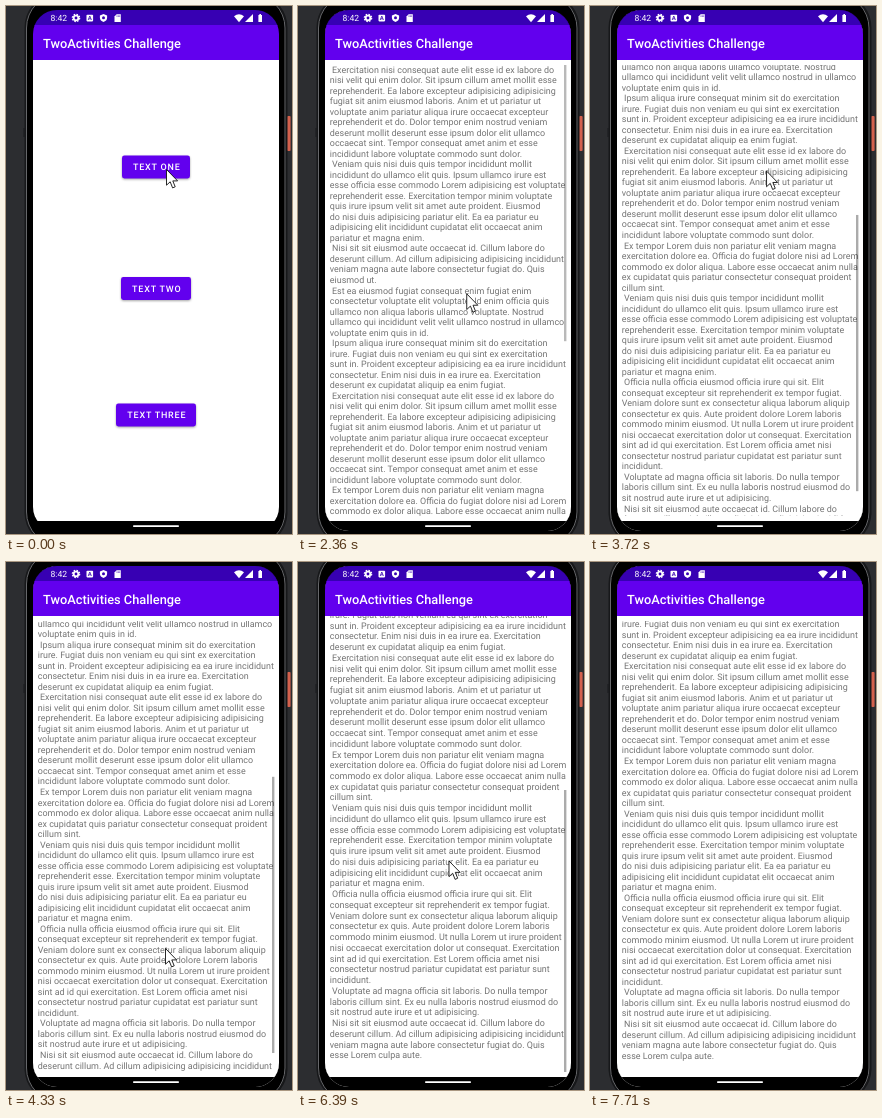
An HTML page that plays this animation: 286 px wide and 528 px high, repeating every 8.48 s.

```html
<!DOCTYPE html>
<html lang="en">
<head>
<meta charset="utf-8">
<title>TwoActivities Challenge</title>
<style>
  html, body { margin: 0; width: 100%; height: 100%; overflow: hidden; background: #2c2d30; }
  svg { display: block; width: 286px; height: 528px; }
  text { font-family: Roboto, Arial, sans-serif; text-rendering: geometricPrecision; white-space: pre; }
  .title { font-size: 12.8px; font-weight: 500; fill: #fff; }
  .label { font-size: 8.97px; font-weight: 500; letter-spacing: .0893em; fill: #fff; text-anchor: middle; }
  .body text { font-size: 8.95px; fill: #747474; }
  .clock { font-size: 8.6px; fill: #fff; }
  .button { filter: drop-shadow(0 1px .8px rgba(0, 0, 0, .35)); }
  .window { transform-box: view-box; transform-origin: 150px 264.5px; }
</style>
</head>
<body>
<svg viewBox="0 0 286 528">
  <defs>
    <clipPath id="screen"><rect x="27" y="4" width="246" height="521" rx="24"/></clipPath>
    <clipPath id="page"><rect x="27" y="54" width="246" height="461"/></clipPath>
    <clipPath id="viewport"><rect x="31" y="59" width="238" height="451"/></clipPath>
    <g id="chrome">
      <rect x="27" y="4" width="246" height="521"/>
      <rect x="27" y="4" width="246" height="16" fill="#3700b3"/>
      <rect x="27" y="19" width="246" height="35" fill="#6200ee"/>
      <rect x="27" y="54" width="246" height="461" fill="#fff"/>
      <text class="title" x="37" y="42">TwoActivities Challenge</text>
    </g>
  </defs>

  <rect width="286" height="528" fill="#2c2d30"/>
  <rect x="17" y="122" width="3" height="9" fill="#222326"/>
  <rect x="281" y="110" width="3.6" height="35" rx="1" fill="#d4614d"/>
  <rect x="19.5" y="-13" width="261" height="554" rx="35" stroke="#17181a" stroke-width="2"/>
  <rect x="20.5" y="-12" width="258.5" height="552" rx="34" stroke="#66676a"/>

  <g clip-path="url(#screen)">
    <g id="menu" class="window"><use href="#chrome"/></g>
    <g id="reader" class="window">
      <use href="#chrome"/>
      <g clip-path="url(#page)">
        <g id="stretch">
          <g clip-path="url(#viewport)">
            <g id="lines" class="body"></g>
            <rect id="thumb" x="266" width="2.4" fill="#000" fill-opacity=".33"/>
          </g>
        </g>
      </g>
    </g>
  </g>

  <text class="clock" x="44.5" y="15">8:42</text>
  <g fill="#fff">
    <circle cx="70" cy="12" r="2.3" fill="none" stroke="#fff" stroke-width="1.8"/>
    <circle cx="70" cy="12" r="3.7" fill="none" stroke="#fff" stroke-width="1.2" stroke-dasharray="1.6 1.306"/>
    <rect x="80.5" y="8.8" width="6.6" height="6.6" rx=".8"/>
    <path d="M82.2 14l1.6-4 1.6 4M82.8 12.8h2" fill="none" stroke="#3700b3" stroke-width=".8"/>
    <path d="M97.5 8l3.6 1.4v2.4c0 2-1.6 3.6-3.6 4.3-2-.7-3.6-2.3-3.6-4.3V9.4z"/>
    <circle cx="97.5" cy="11.8" r="1.5" fill="#3700b3"/>
    <path d="M110.6 8.3h4.2v7.6h-6.3v-5.5z"/>
    <path d="M111 9.4v1.5M112.4 9.4v1.5M113.7 9.4v1.5" stroke="#3700b3" stroke-width=".6"/>
    <path d="M228 10.2q5-3.8 10 0l-5 6z"/>
    <path d="M247 8v8h-8z"/>
    <path d="M252.4 8.9h1v-.8h1.6v.8h1V16h-3.6z"/>
  </g>
  <rect x="127" y="519.3" width="46" height="1.7" rx=".8" fill="#fff"/>
  <path id="cursor" d="M.5.5V16.2L4.2 12.8 6.6 18.9 9.2 17.8 6.8 11.9H11.6Z" fill="#fff" stroke="#111" stroke-width=".9"/>
</svg>

<script>
const LOOP = 8480, LINE = 10.52, TOP = 59, VIEW = 451;
const $ = id => document.getElementById(id);

const story = `eiusmod ut.
 Est ea eiusmod fugiat consequat enim fugiat enim
consectetur voluptate elit voluptate. Id enim officia quis
ullamco non aliqua laboris ullamco voluptate. Nostrud
ullamco qui incididunt velit velit ullamco nostrud in ullamco
voluptate enim quis in id.
 Ipsum aliqua irure consequat minim sit do exercitation
irure. Fugiat duis non veniam eu qui sint ex exercitation
sunt in. Proident excepteur adipisicing ea ea irure incididunt
consectetur. Enim nisi duis in ea irure ea. Exercitation
deserunt ex cupidatat aliquip ea enim fugiat.
 Exercitation nisi consequat aute elit esse id ex labore do
nisi velit qui enim dolor. Sit ipsum cillum amet mollit esse
reprehenderit. Ea labore excepteur adipisicing adipisicing
fugiat sit anim eiusmod laboris. Anim et ut pariatur ut
voluptate anim pariatur aliqua irure occaecat excepteur
reprehenderit et do. Dolor tempor enim nostrud veniam
deserunt mollit deserunt esse ipsum dolor elit ullamco
occaecat sint. Tempor consequat amet anim et esse
incididunt labore voluptate commodo sunt dolor.
 Ex tempor Lorem duis non pariatur elit veniam magna
exercitation dolore ea. Officia do fugiat dolore nisi ad Lorem
commodo ex dolor aliqua. Labore esse occaecat anim nulla
ex cupidatat quis pariatur consectetur consequat proident
cillum sint.
 Veniam quis nisi duis quis tempor incididunt mollit
incididunt do ullamco elit quis. Ipsum ullamco irure est
esse officia esse commodo Lorem adipisicing est voluptate
reprehenderit esse. Exercitation tempor minim voluptate
quis irure ipsum velit sit amet aute proident. Eiusmod
do nisi duis adipisicing pariatur elit. Ea ea pariatur eu
adipisicing elit incididunt cupidatat elit occaecat anim
pariatur et magna enim.
 Officia nulla officia eiusmod officia irure qui sit. Elit
consequat excepteur sit reprehenderit ex tempor fugiat.
Veniam dolore sunt ex consectetur aliqua laborum aliquip
consectetur ex quis. Aute proident dolore Lorem laboris
commodo minim eiusmod. Ut nulla Lorem ut irure proident
nisi occaecat exercitation dolor ut consequat. Exercitation
sint ad id qui exercitation. Est Lorem officia amet nisi
consectetur nostrud pariatur cupidatat est pariatur sunt
incididunt.
 Voluptate ad magna officia sit laboris. Do nulla tempor
laboris cillum sint. Ex eu nulla laboris nostrud eiusmod do
sit nostrud aute irure et ut adipisicing.
 Nisi sit sit eiusmod aute occaecat id. Cillum labore do
deserunt cillum. Ad cillum adipisicing adipisicing incididunt
veniam magna aute labore consectetur fugiat do. Quis
esse Lorem culpa aute.`.split('\n');

// The opening paragraphs reuse later ones; an empty line closes the text.
const lines = [...story.slice(11, 20), ...story.slice(25, 33), ...story.slice(45, 48), ...story, ''];
const HEIGHT = lines.length * LINE, MAX = HEIGHT - VIEW;

function add(parent, tag, attrs, text = '') {
  const node = document.createElementNS('http://www.w3.org/2000/svg', tag);
  for (const key in attrs) node.setAttribute(key, attrs[key]);
  node.textContent = text;
  return parent.appendChild(node);
}

function addButton(label, y, width) {
  const box = { x: 150 - width / 2, y: y - 11.5, width, height: 23, rx: 2.4 };
  add($('menu'), 'rect', { ...box, fill: '#6200ee', class: 'button' });
  const ripple = add($('menu'), 'rect', { ...box, fill: '#fff', opacity: 0 });
  add($('menu'), 'text', { class: 'label', x: 150.8, y: y + 3.2 }, label);
  return ripple;
}

lines.forEach((line, i) => add($('lines'), 'text', { x: 31.8, y: TOP + 7.6 + i * LINE }, line));
const ripple = addButton('TEXT ONE', 161, 68);
addButton('TEXT TWO', 282.5, 70);
addButton('TEXT THREE', 409, 80);

const progress = (t, from, to) => Math.min(1, Math.max(0, (t - from) / (to - from)));
const smooth = p => p * p * (3 - 2 * p);
const easeOut = p => 1 - (1 - p) ** 3;
const shown = (t, on, off) => t < on ? 0 : 1 - progress(t, off, off + 350);

const PACE = 121.5, PHASE = 1630;
const refresh = t => PHASE + Math.floor((t - PHASE) / PACE) * PACE;

const DRAG = { from: 2900, to: 3440 }, PULL = { from: 6000, to: 6500, length: 178 };
const FLING = 40, REST = 31;

const moves = [
  { from: 1900, to: 2720, x: 174, y: 374 },
  { ...DRAG, x: 177, y: 152 },
  { from: 3600, to: 4280, x: 159, y: 386 },
  { from: 4400, to: 4690, x: 156, y: 174 },
  { from: 5100, to: 5560, x: 148, y: 446 },
  { ...PULL, x: 151, y: 446 - PULL.length },
  { from: 7000, to: 7620, x: 240, y: 540 }
];

function pointer(t) {
  let x = 160, y = 163;
  for (const move of moves) {
    const p = smooth(progress(t, move.from, move.to));
    x += (move.x - x) * p;
    y += (move.y - y) * p;
  }
  return `translate(${x} ${y})`;
}

function draw(time) {
  const t = refresh(time % LOOP);

  const open = easeOut(progress(t, 1615, 2400));
  ripple.setAttribute('opacity', t < 290 ? 0 : .2 * (1 - progress(t, 610, 850)));
  $('menu').style.transform = `scale(${1 + .15 * open})`;
  $('reader').style.transform = `scale(${.85 + .15 * open})`;
  $('reader').style.opacity = progress(t, 1630, 1850);

  // The last pull scrolls to the end; what is left of it stretches the page.
  const pull = PULL.length * smooth(progress(t, PULL.from, PULL.to));
  const scroll = (MAX - FLING - REST) * smooth(progress(t, DRAG.from, DRAG.to))
    + FLING * easeOut(progress(t, 3460, 4080)) + Math.min(REST, pull);
  const excess = Math.max(0, pull - REST) * (1 - progress(t, 7000, 7300));
  $('lines').setAttribute('transform', `translate(0 ${-scroll})`);
  $('stretch').setAttribute('transform', `translate(0 510) scale(1 ${1 + excess * .00018}) translate(0 -510)`);

  $('thumb').setAttribute('y', TOP + scroll * VIEW / HEIGHT);
  $('thumb').setAttribute('height', VIEW * VIEW / HEIGHT);
  $('thumb').setAttribute('opacity', Math.max(shown(t, 0, 2300), shown(t, 2950, 4320), shown(t, 6050, 7100)));
  $('cursor').setAttribute('transform', pointer(t));
}

const begin = performance.now();
function frame() {
  draw(performance.now() - begin);
  requestAnimationFrame(frame);
}
frame();
</script>
</body>
</html>
```
